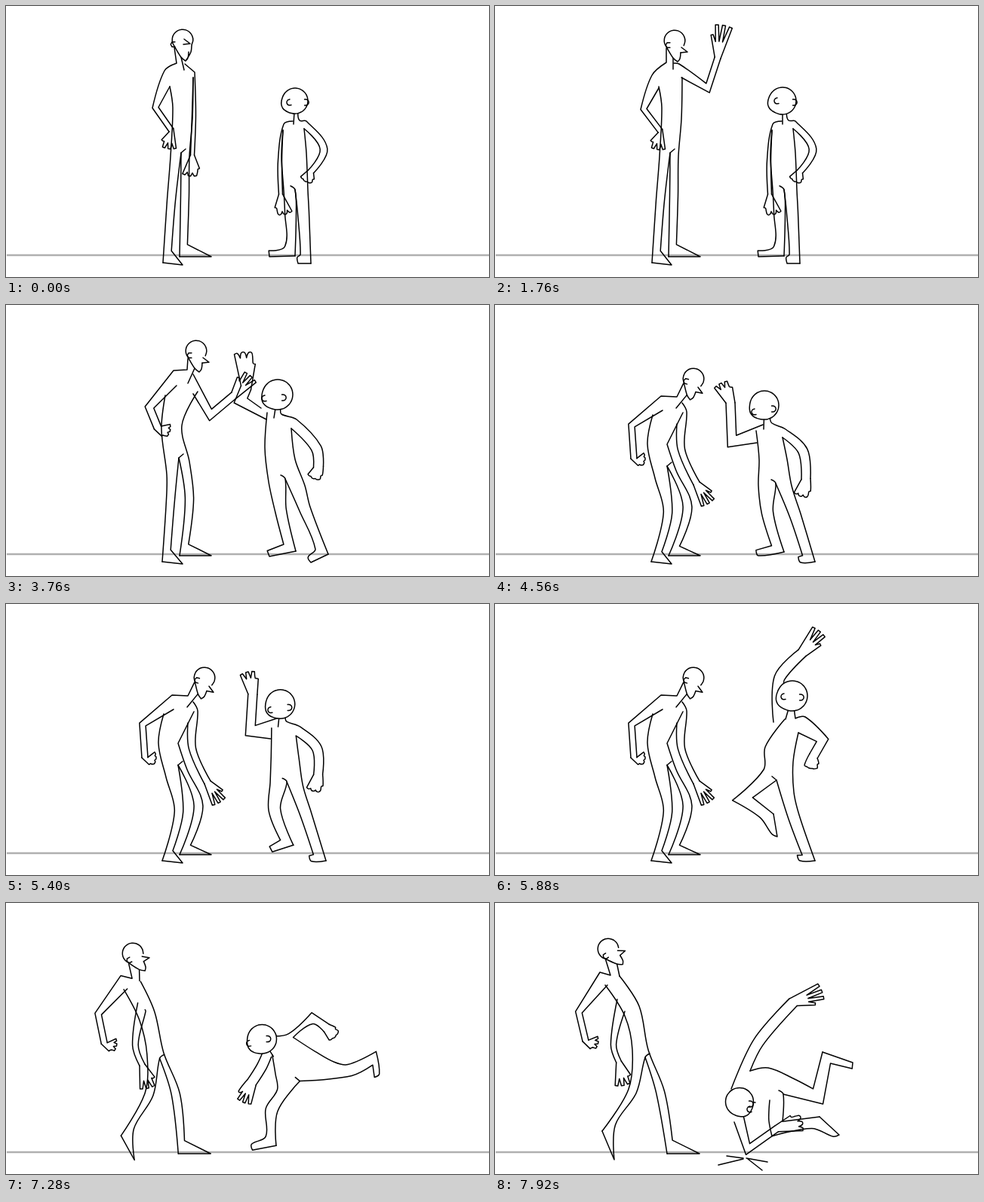
An HTML page that plays this animation: 640x360 px, repeating every 8000 ms.

```html
<!DOCTYPE html>
<html lang="en">
<head>
<meta charset="utf-8">
<title>High five</title>
<style>
html, body { margin: 0; width: 100%; height: 100%; overflow: hidden; background: #fff; }
svg { display: block; width: 100vw; height: 100vh; }
path { fill: none; stroke: #000; stroke-width: 1.5; stroke-linejoin: round; stroke-linecap: round; }
.skull { fill: #fff; }
.ground { stroke: #b0b0b0; stroke-width: 2.5; stroke-linecap: butt; }
</style>
</head>
<body>
<svg id="stage" viewBox="0 0 640 360"><path class="ground" d="M1 331H640"/></svg>
<script>
const LOOP = 8000, RAD = Math.PI / 180;
const stage = document.getElementById('stage');

// ---- Vectors
const add = (a, b, k = 1) => [a[0] + b[0] * k, a[1] + b[1] * k];
const unit = v => { const l = Math.hypot(...v) || 1; return [v[0] / l, v[1] / l]; };
const toward = (a, b) => unit(add(b, a, -1));
const polar = (c, a, r) => [c[0] + Math.cos(a) * r, c[1] + Math.sin(a) * r];
const normal = ([x, y], s) => [-y * s, x * s];
const arc = (c, r, from, to, n = 4) => Array.from({ length: n + 1 },
  (_, i) => polar(c, (from + (to - from) * i / n) * RAD, r));

// Offset of a bent limb's edge at its joint
function miter(a, b, c, s, w) {
  const n1 = normal(toward(a, b), s), n = unit(add(n1, normal(toward(b, c), s)));
  const cos = n[0] * n1[0] + n[1] * n1[1];
  return [n[0] * w / Math.max(cos, .5), n[1] * w / Math.max(cos, .5)];
}

// Smooth line that keeps turns sharper than the limit as corners
function curve(pts, limit) {
  const last = pts.length - 1;
  const dirs = pts.map((p, i) => {
    if (!i || i === last) return [0, 0];
    const u = toward(pts[i - 1], p), v = toward(p, pts[i + 1]);
    return u[0] * v[0] + u[1] * v[1] < limit ? [0, 0] : unit(add(pts[i + 1], pts[i - 1], -1));
  });
  let d = 'M' + pts[0].map(v => v.toFixed(1));
  for (let i = 0; i < last; i++) {
    const p = pts[i], q = pts[i + 1], h = Math.hypot(q[0] - p[0], q[1] - p[1]) / 3;
    d += 'C' + [...add(p, dirs[i], h), ...add(q, dirs[i + 1], -h), ...q].map(v => v.toFixed(1));
  }
  return d;
}

// ---- Body parts
function arm([root, top, pit, elbow, wrist], [angle, len, open, w], s) {
  const start = [(top[0] + pit[0]) / 2, (top[1] + pit[1]) / 2];
  const e = miter(start, elbow, wrist, s, w), n = normal(toward(elbow, wrist), s);
  const a = add(wrist, n, w), b = add(wrist, n, -w);
  const spread = .14 + 8 / len, hand = [a];
  for (let i = 0; i < 4; i++) {
    const g = angle * RAD + s * spread * (1 - i / 1.5), tip = len * (i ? 1 : .72);
    if (i) hand.push(polar(wrist, g + s * spread / 3, len * (1 - .5 * open)));
    hand.push(polar(wrist, g + s * spread / 7, tip), polar(wrist, g - s * spread / 7, tip));
  }
  return {
    outer: [root, top, add(elbow, e), a],
    inner: [pit, add(elbow, e, -1), b],
    hand: [...hand, b]
  };
}

function leg([knee, heel, toe], hip, crotch, outerFront, { face, knee: w, instep, toeHeight }) {
  const mid = [(hip[0] + crotch[0]) / 2, (hip[1] + crotch[1]) / 2];
  const k = miter(mid, knee, heel, -face, w), d = toward(knee, heel), n = normal(d, -face);
  const front = [add(knee, k), add(add(heel, d, -instep[0]), n, instep[1]),
    add(toe, d, -toeHeight), toe, heel];
  const back = [add(knee, k, -1), heel];
  return outerFront ? [front, back] : [back, front];
}

// Each head gives its lines and where the neck meets it
function longHead([x, y, tilt, front]) {
  const c = Math.cos(tilt * RAD), s = Math.sin(tilt * RAD);
  const at = ([u, v]) => [x + u * c - v * s, y + u * s + v * c];
  const skull = [[8, 16], [7, 24], [4, 28], [-2, 23], ...arc([0, 0], 13.8, 140, 388, 10)];
  if (front > .5) skull.push([11, 16], [4, 28]);
  const nose = [[9, 9], [17, 15], [8, 16]].map(p => add(p, [-7, -10], front));
  return {
    skull: skull.map(at), nape: () => at([-11, 10]), jaw: () => at([-2, 23]),
    face: nose.map(at), ear: arc([-8 - 4 * front, 6], 3.8, 60, 300).map(at)
  };
}
function roundHead([x, y, r, eyeX, eyeY, earX, earY]) {
  const cheek = Math.atan2(eyeY - earY, eyeX - earX) - .45;
  const skull = Array.from({ length: 25 }, (_, i) => {
    const a = i / 24 * 2 * Math.PI;
    return polar([x, y], a, r * (1 + .12 * Math.exp(8 * (Math.cos(a - cheek) - 1))));
  });
  const edge = p => add([x, y], toward([x, y], p), r);
  return {
    skull, nape: edge, jaw: edge,
    face: arc([eyeX, eyeY], 4, 60, 270), ear: arc([earX, earY], 4.2, -110, 110)
  };
}

function build(p, body) {
  const { face } = body, head = body.head(p.head);
  const back = arm(p.back, p.backHand, face), front = arm(p.front, p.frontHand, -face);
  const [outL, inL] = leg(p.legL, p.sideL[2], p.crotch, face < 0, body);
  const [outR, inR] = leg(p.legR, p.sideR[2], p.crotch, face > 0, body);
  return {
    left: [...p.sideL, ...outL], right: [...p.sideR, ...outR],
    innerL: [add(p.crotch, [face * 6, -5]), p.crotch, ...inL], innerR: [p.crotch, ...inR],
    throat: [head.jaw(p.throat), p.throat],
    backOuter: [head.nape(p.back[0]), ...back.outer], backInner: back.inner,
    frontOuter: front.outer, frontInner: front.inner,
    skull: head.skull, face: head.face, ear: head.ear,
    backHand: back.hand, frontHand: front.hand
  };
}

const tall = { face: 1, corner: .75, knee: 5.5, instep: [17, 9], toeHeight: 0, head: longHead };
const short = { face: -1, corner: .25, knee: 7.5, instep: [14, 12], toeHeight: 8, head: roundHead };

// ---- Poses
// arm: root, shoulder, armpit, elbow, wrist; hand: angle, length, openness, limb half-width
// side: armpit, waist, hip; leg: knee, heel, toe
const stand = {
  head: [234, 45, 0, 1], throat: [236, 85], crotch: [232, 195],
  back: [[226, 76], [210, 86], [217, 107], [198, 135], [219, 165]], backHand: [105, 25, .6, 3.5],
  front: [[237, 77], [250, 88], [248, 95], [249, 145], [247, 198]], frontHand: [90, 28, .3, 2.5],
  sideL: [[217, 107], [221, 135], [218, 200]], legL: [[219, 258], [208, 341], [234, 344]],
  sideR: [[248, 95], [247, 150], [243, 200]], legR: [[237, 252], [230, 333], [272, 333]]
};
const offer = {
  ...stand, head: [238, 46, 0, 0], throat: [236, 84],
  back: [[227, 75], [208, 92], [217, 109], [197, 137], [219, 166]],
  front: [[237, 76], [244, 77], [247, 95], [284, 113], [308, 94]], frontHand: [-25, 21, .9, 4]
};
const wave = {
  ...offer, front: [[237, 76], [244, 77], [247, 95], [282, 109], [295, 69]], frontHand: [-85, 44, 1, 4]
};
const struck = { ...wave, frontHand: [-92, 45, 1, 4] };
const lean = {
  head: [252, 61, 0, 0], throat: [241, 104], crotch: [229, 203],
  back: [[240, 86], [222, 87], [226, 107], [190, 136], [201, 163]], backHand: [25, 17, .3, 5],
  front: [[248, 92], [248, 92], [248, 118], [271, 146], [302, 120]], frontHand: [-55, 34, .8, 5],
  sideL: [[211, 120], [206, 165], [213, 225]], legL: [[218, 259], [207, 341], [234, 344]],
  sideR: [[254, 115], [233, 160], [243, 208]], legR: [[243, 258], [230, 333], [272, 333]]
};
const crouch = {
  head: [263, 98, 17, 0], throat: [240, 137], crotch: [228, 214],
  back: [[241, 122], [220, 121], [222, 140], [181, 160], [184, 204]], backHand: [15, 15, .2, 4],
  front: [[248, 130], [254, 142], [241, 158], [247, 192], [267, 237]], frontHand: [52, 31, 1, 4.5],
  sideL: [[209, 146], [202, 185], [212, 230]], legL: [[229, 276], [207, 341], [234, 344]],
  sideR: [[249, 143], [228, 185], [240, 220]], legR: [[255, 268], [230, 333], [272, 333]]
};
const stride = {
  head: [150, 61, -35, 0], throat: [165, 97], crotch: [199, 205],
  back: [[153, 96], [139, 92], [149, 109], [111, 145], [120, 183]], backHand: [20, 17, .5, 4],
  front: [[172, 144], [172, 144], [162, 128], [157, 188], [164, 211]], frontHand: [73, 32, .6, 3.5],
  sideL: [[146, 109], [172, 150], [182, 195]], legL: [[182, 250], [142, 303], [158, 341]],
  sideR: [[165, 97], [191, 137], [203, 195]], legR: [[219, 251], [228, 333], [271, 333]]
};

const wait = {
  head: [383, 126, 17, 376, 128, 397, 128], throat: [381, 157], crotch: [383, 244],
  back: [[389, 152], [398, 153], [395, 163], [421, 190], [404, 220]], backHand: [110, 15, .1, 4],
  front: [[380, 153], [368, 157], [367, 165], [363, 205], [364, 250]], frontHand: [85, 27, .3, 2.5],
  sideL: [[367, 165], [365, 200], [368, 245]], legL: [[377, 274], [383, 332], [349, 333]],
  sideR: [[395, 163], [398, 195], [400, 245]], legR: [[394, 275], [404, 342], [387, 342]]
};
const look = { ...wait, head: [381, 126, 18, 374, 126, 396, 128] };
const wind = {
  head: [386, 118, 18, 376, 118, 397, 120], throat: [380, 148], crotch: [378, 237],
  back: [[394, 146], [412, 152], [404, 166], [426, 190], [417, 214]], backHand: [110, 16, .2, 6],
  front: [[379, 140], [379, 140], [372, 152], [348, 92], [350, 62]], frontHand: [-95, 30, .8, 6],
  sideL: [[372, 152], [364, 200], [364, 245]], legL: [[367, 278], [382, 330], [349, 333]],
  sideR: [[404, 166], [402, 210], [408, 255]], legR: [[404, 280], [425, 341], [405, 342]]
};
const slap = {
  head: [360, 119, 20, 343, 124, 367, 123], throat: [355, 150], crotch: [370, 231],
  back: [[365, 145], [385, 152], [378, 164], [411, 190], [414, 215]], backHand: [105, 17, .1, 6.5],
  front: [[338, 137], [338, 137], [345, 152], [311, 127], [318, 110]], frontHand: [-89, 47, .3, 7],
  sideL: [[346, 143], [343, 190], [348, 235]], legL: [[364, 273], [384, 327], [349, 334]],
  sideR: [[378, 164], [383, 205], [396, 240]], legR: [[396, 271], [427, 331], [404, 342]]
};
const duck = {
  head: [357, 133, 19, 344, 142, 368, 138], throat: [356, 165], crotch: [372, 237],
  back: [[367, 157], [385, 165], [381, 176], [408, 194], [412, 231]], backHand: [100, 24, .2, 6],
  front: [[355, 159], [355, 159], [347, 183], [314, 181], [312, 130]], frontHand: [-110, 29, .5, 6],
  sideL: [[346, 167], [350, 205], [349, 240]], legL: [[361, 276], [383, 328], [349, 333]],
  sideR: [[381, 176], [387, 205], [393, 240]], legR: [[398, 280], [424, 341], [405, 342]]
};
const settle = { ...duck, head: [358, 135, 19, 345, 144, 369, 140], frontHand: [-106, 29, .5, 6] };
const reach = {
  head: [394, 122, 20, 383, 123, 405, 124], throat: [385, 153], crotch: [373, 234],
  back: [[398, 152], [411, 150], [402, 171], [434, 181], [422, 202]], backHand: [95, 17, .05, 6],
  front: [[384, 112], [384, 112], [369, 157], [377, 98], [407, 65]], frontHand: [-45, 37, .9, 6.5],
  sideL: [[384, 153], [358, 190], [356, 220]], legL: [[328, 259], [369, 279], [374, 309]],
  sideR: [[402, 171], [395, 210], [396, 250]], legR: [[396, 283], [424, 341], [404, 341]]
};
const arch = {
  head: [430, 132, 20.5, 410, 131, 439, 136], throat: [404, 161], crotch: [386, 229],
  back: [[424, 160], [440, 156], [426, 176], [460, 191], [445, 209]], backHand: [125, 18, .05, 6],
  front: [[418, 114], [418, 114], [386, 166], [444, 101], [476, 92]], frontHand: [12, 32, .9, 5],
  sideL: [[394, 150], [383, 185], [383, 211]], legL: [[331, 223], [363, 266], [350, 298]],
  sideR: [[426, 176], [409, 210], [408, 255]], legR: [[406, 285], [424, 341], [404, 342]]
};
const tense = { ...arch, frontHand: [10, 34, .9, 5] };
const dive = {
  head: [322, 190, 19, 306, 197, 329, 189], throat: [345, 212], crotch: [390, 238],
  back: [[339, 180], [362, 177], [372, 179], [395, 146], [421, 158]], backHand: [20, 16, .1, 6],
  front: [[328, 208], [328, 208], [345, 212], [319, 239], [297, 266]], frontHand: [140, 28, .8, 7],
  sideL: [[345, 212], [352, 235], [355, 255]], legL: [[356, 285], [357, 333], [322, 334]],
  sideR: [[372, 179], [410, 195], [440, 203]], legR: [[465, 210], [503, 170], [512, 205]]
};
const fall = {
  head: [324, 264, 18.5, 338, 274, 338, 267], throat: [345, 265], crotch: [382, 254],
  back: [[329, 282], [329, 282], [317, 291], [335, 327], [373, 300]], backHand: [-20, 35, .3, 4.5],
  front: [[338, 223], [338, 223], [313, 247], [349, 185], [395, 132]], frontHand: [-15, 41, 1, 7],
  sideL: [[364, 262], [363, 275], [363, 290]], legL: [[374, 300], [430, 284], [456, 308]],
  sideR: [[338, 223], [362, 219], [395, 233]], legR: [[428, 257], [434, 198], [474, 212]]
};

// ---- Motion
const linear = p => p, easeIn = p => p * p, easeOut = p => 1 - (1 - p) ** 2;
const smooth = p => p * p * (3 - 2 * p);
const mix = (a, b, p) => typeof a === 'number' ? a + (b - a) * p
  : Array.isArray(a) ? a.map((v, i) => mix(v, b[i], p))
  : Object.fromEntries(Object.keys(a).map(k => [k, mix(a[k], b[k], p)]));

function addPath(cls) {
  const el = document.createElementNS('http://www.w3.org/2000/svg', 'path');
  el.setAttribute('class', cls);
  return stage.appendChild(el);
}

// Each move: first step, last step, number of steps, pose, easing
function actor(body, rest, moves) {
  const paths = Object.keys(build(rest, body)).map(k => [k, addPath(k)]);
  return t => {
    let from = rest, now = rest;
    for (const [start, end, n, to, ease = smooth] of moves) {
      if (t < start) break;
      const gap = (end - start) / (n - 1) || 1;
      now = mix(from, to, ease(Math.min(1, (Math.floor((t - start) / gap + .001) + 1) / n)));
      from = to;
    }
    const lines = build(now, body);
    for (const [k, el] of paths) el.setAttribute('d', curve(lines[k], body.corner));
  };
}

const actors = [
  actor(tall, stand, [
    [640, 960, 5, offer, easeIn],
    [1040, 1280, 4, wave, easeOut],
    [3240, 3240, 1, struck],
    [3320, 3320, 1, wave],
    [3760, 3760, 1, lean],
    [3840, 4320, 7, crouch],
    [7040, 7400, 5, stride, easeOut]
  ]),
  actor(short, wait, [
    [1760, 1760, 1, look],
    [2280, 2640, 7, wind],
    [3000, 3400, 6, slap],
    [4480, 4560, 2, duck, linear],
    [4640, 4720, 2, settle, linear],
    [5320, 5880, 8, reach],
    [5960, 6120, 3, mix(reach, arch, .35), easeOut],
    [6200, 6520, 5, arch, easeOut],
    [6680, 6680, 1, tense],
    [7040, 7400, 5, dive, easeOut],
    [7560, 7920, 6, fall]
  ])
];
const impact = addPath('impact');
impact.setAttribute('d', 'M307 336L329 339M296 348L329 340M333 339L361 344M335 340L354 355');

function draw(now) {
  const t = now % LOOP;
  actors.forEach(a => a(t));
  impact.style.display = t >= 7776 ? '' : 'none';
  requestAnimationFrame(draw);
}
draw(0);
</script>
</body>
</html>
```
